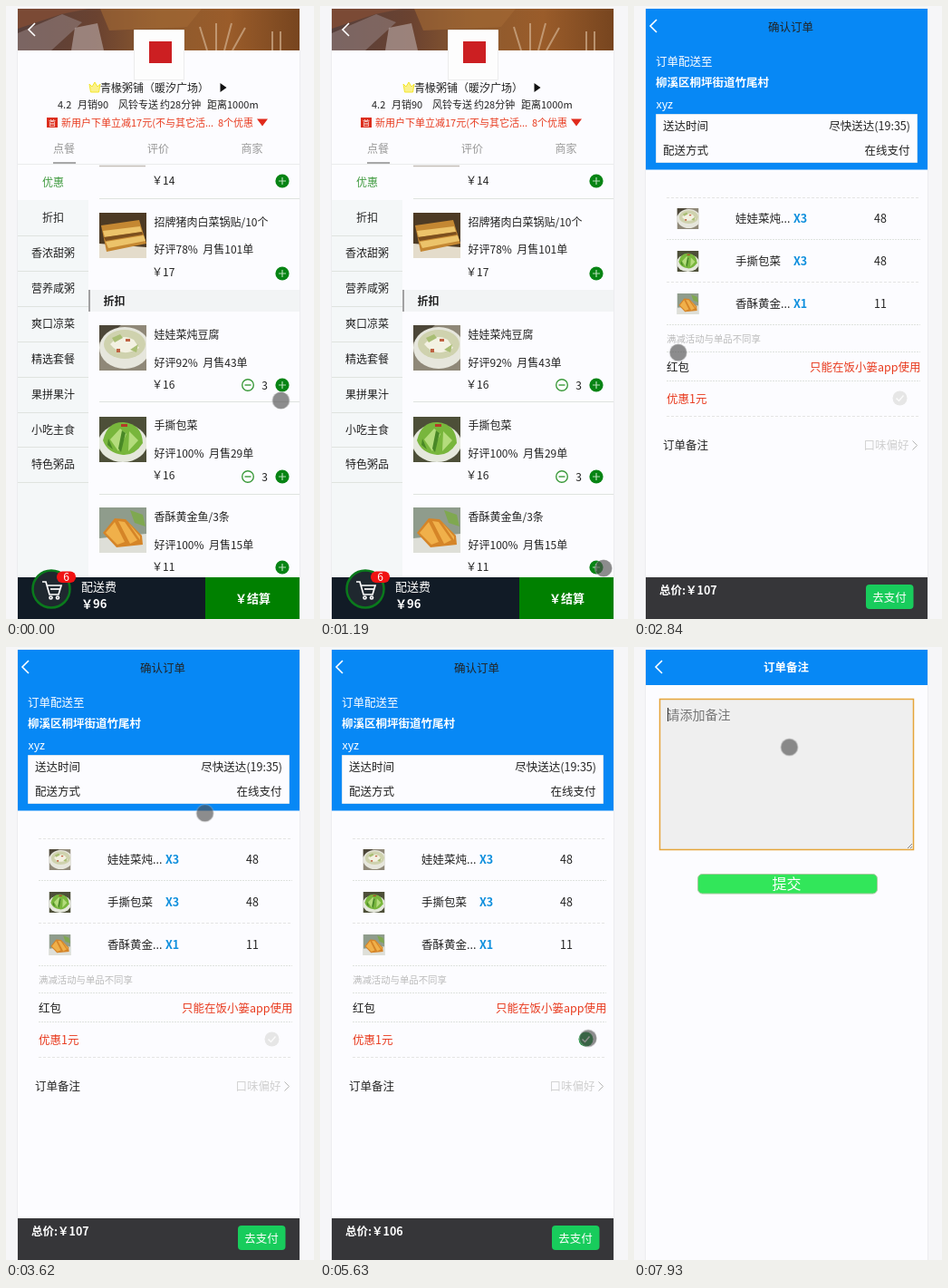
Animation of 340 by 676 pixels, one loop 8 s. Source, as an HTML page:

```html
<!DOCTYPE html>
<html lang="zh-CN">
<head>
<meta charset="utf-8">
<title>点餐</title>
<style>
html, body { margin: 0; width: 100%; height: 100%; overflow: hidden; background: #f6f6f8; }
svg { display: block; width: 340px; height: 676px; }
text { font: 12px "Noto Sans CJK SC", "Noto Sans CJK", "Noto Sans", sans-serif; fill: #222; white-space: pre; }
.s11 text { font-size: 11px; }
.s13 text { font-size: 13px; }
#order text, #note text { font-size: 12.5px; }
#note .area { font-size: 14px; fill: #757575; }
#note .send { font-size: 16px; }
#note .status { font-size: 12px; fill: #666; }
#order .tip { font-size: 10.4px; fill: #bbb; }
text.mid { text-anchor: middle; }
text.end { text-anchor: end; }
text.bold { font-weight: 700; }
.red text, text.red { fill: #e83a1e; }
.white text, text.white { fill: #fff; }
.blue text { fill: #0f8fdd; }
.tabs text { fill: #999; }
.rule { stroke: #dfe3df; fill: none; }
.dash { stroke: #e4e4e4; fill: none; stroke-dasharray: 3 2; }
.edge { stroke: #ececef; }

/* 8 s loop: pages are stacked and peel away */
#shop, #order, .before, .after, .anim { animation: 8s step-end infinite; }
#shop { animation-name: leave-shop; }
#order { animation-name: leave-order; }
.before { animation-name: add-out; }
.after { animation-name: add-in; }
.unticked { animation-name: tick-out; }
.ticked { animation-name: tick-in; }
.loading { animation-name: load-out; }
.focus { animation-name: focus-in; }
@keyframes leave-shop { 0% { visibility: visible } 30.85%, 100% { visibility: hidden } }
@keyframes leave-order { 0% { visibility: visible } 89.85%, 100% { visibility: hidden } }
@keyframes add-out { 0% { opacity: 1 } 18.75%, 100% { opacity: 0 } }
@keyframes add-in { 0% { opacity: 0 } 18.75%, 100% { opacity: 1 } }
@keyframes tick-out { 0% { opacity: 1 } 70.35%, 100% { opacity: 0 } }
@keyframes tick-in { 0% { opacity: 0 } 70.35%, 100% { opacity: 1 } }
@keyframes load-out { 0% { opacity: 1 } 95%, 100% { opacity: 0 } }
@keyframes focus-in { 0% { opacity: 0 } 99.1%, 100% { opacity: 1 } }

#pointer { animation: move 8s ease-in-out infinite; }
@keyframes move {
  0%, 4% { transform: translate(303.5px, 435px) }
  13.5%, 15% { transform: translate(313px, 620px) }
  17%, 21% { transform: translate(306px, 619px) }
  28%, 31.4% { transform: translate(288px, 657px); animation-timing-function: linear }
  34% { transform: translate(130px, 190px); animation-timing-function: linear }
  35.5% { transform: translate(48px, 380px); animation-timing-function: linear }
  37%, 39.5% { transform: translate(140px, 640px); animation-timing-function: linear }
  41.9% { transform: translate(290px, 560px); animation-timing-function: linear }
  45.25% { transform: translate(219.5px, 183px); animation-timing-function: linear }
  49.4% { transform: translate(254px, 246px) }
  56% { transform: translate(302px, 400px) }
  59.6%, 77% { transform: translate(296px, 431.5px) }
  79.8% { transform: translate(299px, 510px) }
  81.1%, 93% { transform: translate(291.5px, 484.5px) }
  96.6%, 100% { transform: translate(171.5px, 110.5px) }
}
</style>
</head>
<body>
<svg viewBox="0 0 340 676">
  <defs>
    <linearGradient id="banner">
      <stop offset="0" stop-color="#57403c"/><stop offset=".28" stop-color="#6a4230"/>
      <stop offset=".5" stop-color="#8d5a2e"/><stop offset=".75" stop-color="#9a5c2a"/>
      <stop offset="1" stop-color="#77451f"/>
    </linearGradient>
    <symbol id="pancake" viewBox="0 0 52 50">
      <path fill="#4d3a24" d="M0 0h52v50H0z"/>
      <path fill="#e4dccb" d="m0 34 52 4v12H0z"/>
      <path fill="#c48732" d="m2 14 42-6 8 26-44 9z"/>
      <path fill="#ecc36a" d="m4 20 41-5 2 6-41 6zm3 12 42-7 2 6-41 8z"/>
      <path fill="#7c4f1e" d="m5 27 42-6 1 3-41 7z"/>
    </symbol>
    <symbol id="soup" viewBox="0 0 52 50">
      <path fill="#8f8878" d="M0 0h52v50H0z"/>
      <path fill="#4c4638" d="M0 0h24L0 19z"/>
      <ellipse cx="28" cy="25" rx="28" ry="23" fill="#e6e6dc"/>
      <ellipse cx="28" cy="21" rx="23" ry="16" fill="#cfd2ae"/>
      <path fill="#f3f1e2" d="M12 21q12-13 26-5l6 9q-19 12-32-4z"/>
      <path fill="#a9be74" d="m14 14 9-4 3 4-9 5zm20 13 9-6-2 9z"/>
      <path fill="#bf6242" d="M29 15h5v3h-5zm-10 11h4v4h-4z"/>
    </symbol>
    <symbol id="greens" viewBox="0 0 52 50">
      <path fill="#4d4f38" d="M0 0h52v50H0z"/>
      <ellipse cx="26" cy="29" rx="27" ry="21" fill="#e5e8dc"/>
      <path fill="#78b63c" d="M4 26Q9 5 27 6q20 2 21 23-9 14-22 13-17-2-22-16z"/>
      <path fill="#b4dc7c" d="m12 25 11-12 7 6-9 19zm21-9 10 10-11 12z"/>
      <path fill="#498826" d="m25 15 4 3-5 21-3-4zm-15 9 5 12-6-5z"/>
      <path fill="#b43b28" d="M24 8h7v3h-7z"/>
    </symbol>
    <symbol id="fish" viewBox="0 0 52 50">
      <path fill="#8f9c8c" d="M0 0h52v50H0z"/>
      <path fill="#dedfd8" d="m0 34 52-5v21H0z"/>
      <path fill="#7fa850" d="m34 3 14 5 3 13-12-4z"/>
      <path fill="#d58528" d="m4 28 13-16 12 1 18 18 1 10-29 3z"/>
      <path fill="#f0b04a" d="m7 28 10-12 11 22-8 3zm14-13 7 1 14 20-8 4zm11 2 13 15v4z"/>
    </symbol>
    <g id="plus">
      <circle r="7.6" fill="#078414"/>
      <path d="M-4 0h8M0-4v8" stroke="#b5dcb5" stroke-width="1.2"/>
    </g>
    <g id="minus">
      <circle r="6.3" fill="#fff" stroke="#3c9a3c" stroke-width="1.4"/>
      <path d="M-3.5 0h7" stroke="#3c9a3c" stroke-width="1.4"/>
    </g>
    <path id="back" d="m4-7-7 7 7 7" fill="none" stroke="#fff" stroke-width="1.6"/>
    <path id="sheet" d="M13 3h311v673H13z" fill="#fcfcff"/>
  </defs>

  <path d="M0 0h340v676H0z" fill="#f6f6f8"/>

  <g id="note">
    <use href="#sheet"/>
    <path d="M13 3h311v39H13z" fill="#0788f5"/>
    <use href="#back" x="27" y="22"/>
    <text class="white bold" x="143" y="27">订单备注</text>
    <path d="M28.5 57.5h280v166h-280z" fill="#efefef" stroke="#cfcfcf"/>
    <path d="m302 222 5-5m-2 5 2-2" stroke="#888"/>
    <text class="area" x="36.5" y="79.5">请添加备注</text>
    <g class="anim focus">
      <path d="M28.5 57.5h280v166h-280z" fill="none" stroke="#e5a53a" stroke-width="1.5"/>
      <path d="M37.5 67v15" stroke="#222"/>
    </g>
    <rect x="70.5" y="250.5" width="198" height="21.5" rx="5" fill="#32e65a" stroke="#a9c9a0"/>
    <text class="send white mid" x="168.5" y="267">提交</text>
    <g class="anim loading">
      <path d="M12.5 676v-20.5h99q3 0 3 3V676" fill="#f9f9fa" stroke="#dcdcdc"/>
      <text class="status" x="16" y="671">正在连接...</text>
    </g>
  </g>

  <g id="order">
    <use href="#sheet"/>
    <path d="M13 3h311v177.5H13z" fill="#0788f5"/>
    <use href="#back" x="21" y="22"/>
    <text x="148" y="27.5">确认订单</text>
    <g class="white">
      <text x="24" y="66">订单配送至</text>
      <text class="bold" x="24" y="89">柳溪区桐坪街道竹尾村</text>
      <text x="24.5" y="112.5">xyz</text>
    </g>
    <path d="M24.5 119.5h288v53h-288z" fill="#fcfcff" stroke="#d5e4f0"/>
    <text x="32" y="137">送达时间</text><text class="end" x="305" y="137">尽快送达(19:35)</text>
    <text x="32" y="164">配送方式</text><text class="end" x="304.5" y="164">在线支付</text>

    <path class="dash" d="M36 211.5h280M36 304.5h280M36 452.5h280"/>
    <path class="rule" d="M36 257.5h280M36 351.5h280M36 381.5h280M36 413.5h280" stroke-dasharray="2 1"/>
    <use href="#soup" x="47.5" y="222.5" width="24" height="24"/>
    <use href="#greens" x="47.5" y="269.5" width="24" height="24"/>
    <use href="#fish" x="47.5" y="316.5" width="24" height="24"/>
    <text x="112" y="239">娃娃菜炖...</text><text x="265" y="239">48</text>
    <text x="112" y="286">手撕包菜</text><text x="265" y="286">48</text>
    <text x="112" y="333">香酥黄金...</text><text x="265" y="333">11</text>
    <g class="blue">
      <text class="bold" x="176" y="239">X3</text>
      <text class="bold" x="176" y="286">X3</text>
      <text class="bold" x="176" y="333">X1</text>
    </g>
    <text class="tip" x="36" y="371">满减活动与单品不同享</text>
    <text x="36" y="402.5">红包</text>
    <text class="red end" x="316.5" y="402.5">只能在饭小篓app使用</text>
    <text class="red" x="36" y="438">优惠1元</text>
    <g class="anim unticked">
      <circle cx="293.5" cy="432.5" r="8" fill="#e6e6e6"/>
      <path d="m289.5 432.5 3 3 5-6" fill="none" stroke="#fafafa" stroke-width="1.5"/>
    </g>
    <g class="anim ticked">
      <circle cx="293.5" cy="432.5" r="8" fill="#128a35"/>
      <path d="m289.5 432.5 3 3 5-6" fill="none" stroke="#fff" stroke-width="1.5"/>
    </g>
    <text x="32" y="489">订单备注</text>
    <text class="end" style="fill: #d0d0d0" x="303.5" y="489">口味偏好</text>
    <path d="m307.5 479.5 5 5-5 5" fill="none" stroke="#b5b5b5"/>

    <path d="M13 630h311v46H13z" fill="#363639"/>
    <g class="white">
      <text class="bold anim unticked" x="28" y="648.5">总价:￥107</text>
      <text class="bold anim ticked" x="28" y="648.5">总价:￥106</text>
      <rect x="256" y="638" width="52.5" height="27" rx="4" fill="#18cc5c"/>
      <text class="mid" x="282" y="656.5">去支付</text>
    </g>
  </g>

  <g id="shop">
    <use href="#sheet"/>
    <path d="M13 3h311v46H13z" fill="url(#banner)"/>
    <path d="M13 30 62 9l22 9-34 31H13z" fill="#8a7672" opacity=".7"/>
    <path d="m76 24 25-5 7 30H72z" fill="#bcaeac" opacity=".6"/>
    <path d="M13 3h78l-30 6-48 16z" fill="#7b4a35"/>
    <path d="M104 3h112l-16 20-86 4z" fill="#a46a34" opacity=".6"/>
    <path d="m222 49-8-26m18 26V19m9 30 8-30m1 30 14-25m30 25V28m9 21V28" fill="none" stroke="#d2b190" stroke-width="2" opacity=".7"/>
    <use href="#back" x="28" y="26"/>
    <path d="M141.5 26.5h55v55h-55z" fill="#fdfdfd" stroke="#ececec"/>
    <path d="M158 39h25v24h-25z" fill="#cc1f22"/>

    <path d="m92 86 3 3 3-5 3 5 3-3-1.5 9h-9z" fill="#fbf18a" stroke="#f3e62c"/>
    <text x="104" y="94.5">青椽粥铺（暖汐广场）</text>
    <path d="m236.5 85 7 5-7 5z" fill="#111"/>
    <g class="s11">
      <text x="57" y="113">4.2</text><text x="79" y="113">月销90</text>
      <text x="124" y="113">风铃专送</text><text x="170" y="113">约28分钟</text>
      <text x="222" y="113">距离1000m</text>
    </g>
    <g class="s11 red">
      <path d="M45 123h12v11H45z" fill="#dc2d1c"/>
      <text x="47" y="131.5" style="font-size: 8px; fill: #fff">首</text>
      <text x="61" y="132.5">新用户下单立减17元(不与其它活...</text>
      <text x="234" y="132.5">8个优惠</text>
      <path d="M277 124.5h12l-6 8z" fill="#e02a1c"/>
    </g>
    <g class="tabs">
      <text x="52" y="161.5">点餐</text>
      <text x="156" y="161.5">评价</text><text x="259.5" y="161.5">商家</text>
    </g>
    <path class="rule" d="M13 174.5h311" opacity=".6"/>
    <path d="M52 173h25" stroke="#8c8c8c" stroke-width="1.5"/>

    <path d="M13 214h78v416H13z" fill="#f4f7f8"/>
    <path class="rule" d="M13 253.5h78M13 292.5h78M13 331.5h78M13 370.5h78M13 409.5h78M13 448.5h78M13 486.5h78M13 525.5h78"/>
    <text class="mid" x="52" y="198.5" style="fill: #3f9a3f">优惠</text>
    <text class="mid" x="52" y="237.5">折扣</text>
    <text class="mid" x="52" y="276.5">香浓甜粥</text>
    <text class="mid" x="52" y="315.5">营养咸粥</text>
    <text class="mid" x="52" y="354.5">爽口凉菜</text>
    <text class="mid" x="52" y="393.5">精选套餐</text>
    <text class="mid" x="52" y="432.5">果拼果汁</text>
    <text class="mid" x="52" y="471.5">小吃主食</text>
    <text class="mid" x="52" y="510">特色粥品</text>

    <path d="M103 176.5h51" stroke="#c3bdb6" stroke-width="1.5"/>
    <text x="161" y="196.5">￥14</text><use href="#plus" x="305" y="193"/>
    <path class="rule" d="M103 212.5h221M103 436.5h221M103 538.5h221"/>

    <use href="#pancake" x="103" y="228" width="52" height="50"/>
    <text x="163.5" y="243">招牌猪肉白菜锅贴/10个</text>
    <text x="163.5" y="273">好评78%  月售101单</text>
    <text x="161" y="297.5">￥17</text><use href="#plus" x="305" y="295"/>

    <path d="M92 313h232v24H92z" fill="#f2f4f5"/>
    <path d="M92 313v24" stroke="#858585" stroke-width="1.5"/>
    <text class="bold" x="107.5" y="329.5">折扣</text>

    <use href="#soup" x="103" y="352" width="52" height="50"/>
    <text x="163.5" y="366.5">娃娃菜炖豆腐</text>
    <text x="163.5" y="397.5">好评92%  月售43单</text>
    <text x="161" y="421.5">￥16</text>
    <use href="#minus" x="267" y="418"/><text class="mid" x="285.5" y="422.5">3</text><use href="#plus" x="305" y="418"/>

    <use href="#greens" x="103" y="453" width="52" height="50"/>
    <text x="163.5" y="466.5">手撕包菜</text>
    <text x="163.5" y="497.5">好评100%  月售29单</text>
    <text x="161" y="521.5">￥16</text>
    <use href="#minus" x="267" y="519"/><text class="mid" x="285.5" y="523.5">3</text><use href="#plus" x="305" y="519"/>

    <use href="#fish" x="103" y="553" width="52" height="50"/>
    <text x="163.5" y="568">香酥黄金鱼/3条</text>
    <text x="163.5" y="598.5">好评100%  月售15单</text>
    <text x="161" y="622.5">￥11</text>
    <g class="after"><use href="#minus" x="267" y="619"/><text class="mid" x="285.5" y="623.5">1</text></g>
    <use href="#plus" x="305" y="619"/>

    <path d="M13 630h207v46H13z" fill="#111b26"/>
    <path d="M220 630h104v46H220z" fill="#008000"/>
    <circle cx="50" cy="643" r="20.5" fill="#1f282f" stroke="#0a7a1c" stroke-width="2.5"/>
    <g fill="none" stroke="#fff" stroke-width="1.7">
      <path d="M40 635h4l4 14h10l3-10H46"/>
      <path d="M49 643h10"/>
      <circle cx="49.5" cy="652.5" r="1.5"/><circle cx="57" cy="652.5" r="1.5"/>
    </g>
    <rect x="56" y="623.5" width="21" height="12.5" rx="6" fill="#f01212"/>
    <g class="white s13">
      <text class="mid before" x="66.5" y="634" style="font-size: 12px">6</text>
      <text class="mid after" x="66.5" y="634" style="font-size: 12px">7</text>
      <text x="83" y="645">配送费</text>
      <text class="bold before" x="83" y="664">￥96</text>
      <text class="bold after" x="83" y="664">￥107</text>
      <text class="bold" x="253" y="658">￥结算</text>
    </g>
  </g>

  <path class="edge" d="M12.5 3v673M324.5 3v673"/>
  <circle id="pointer" r="9.6" fill="#505050" fill-opacity=".65" stroke="#fff" stroke-opacity=".3"/>
</svg>
</body>
</html>
```
